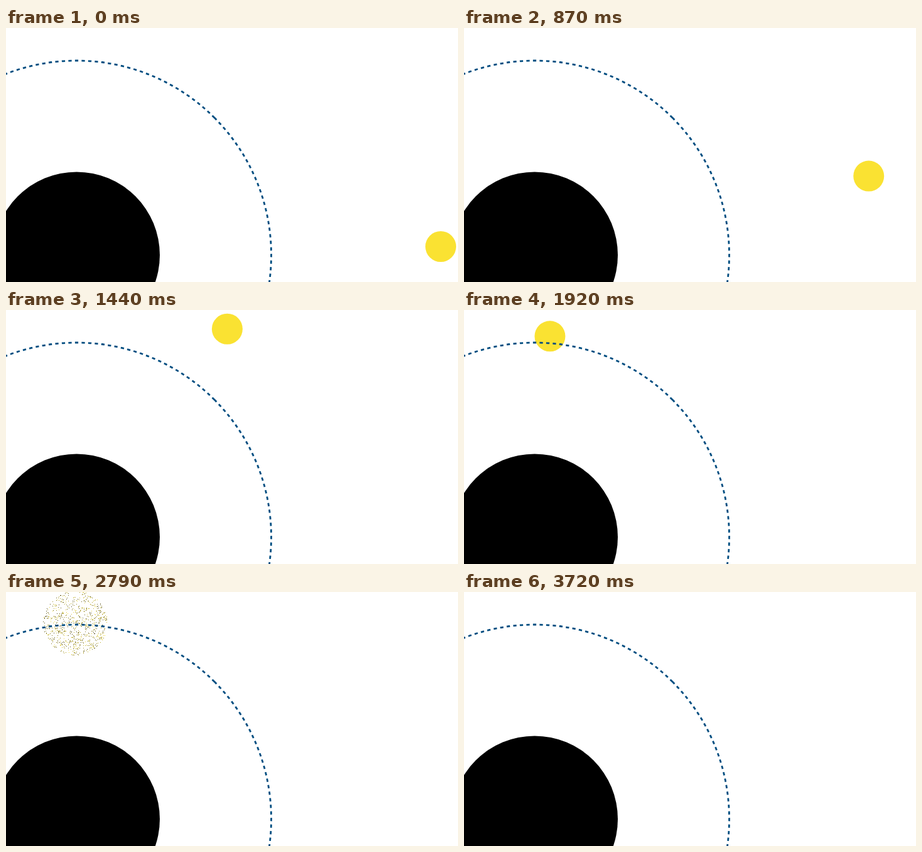
Animation, 720 px wide and 405 px high, one loop 4110 ms. Source, as an HTML page with a canvas:

```html
<!DOCTYPE html>
<html lang="en">
<head>
<meta charset="utf-8">
<title>Orbit</title>
<style>
html, body { margin: 0; width: 100%; height: 100%; overflow: hidden; background: #fff; }
canvas, svg { position: absolute; left: 0; top: 0; width: 720px; height: 405px; display: block; }
</style>
</head>
<body>
<canvas id="dust" width="720" height="405"></canvas>
<svg viewBox="0 0 720 405">
  <path id="route" fill="none" d="M692.5 348.5C634 129 398 -46.5 112 49.5"/>
  <circle cx="112.5" cy="362" r="132.5"/>
  <circle id="star" r="24.5" fill="#fae232"/>
  <circle cx="112.5" cy="362" r="310" fill="none" stroke="#004d80" stroke-width="2.8"
    stroke-dasharray="5.25 5.25" transform="rotate(-45 112.5 362)"/>
</svg>
<script>
const LOOP = 4110, STEP = 30;
const FLY = 360, FLY_TIME = 1800;
const BURST = FLY + FLY_TIME, BURST_TIME = 1560;
const star = document.getElementById('star');
const route = document.getElementById('route');
const routeLength = route.getTotalLength();
const ctx = document.getElementById('dust').getContext('2d');

let seed = 7321;
function rnd() {
  seed = (seed * 1664525 + 1013904223) % 4294967296;
  return seed / 4294967296;
}

const grains = Array.from({ length: 1500 }, () => ({
  angle: rnd() * Math.PI * 2,
  dist: Math.sqrt(rnd()),
  life: 0.1 + 0.9 * Math.pow(rnd(), 1.5),
  dark: rnd() * 0.75
}));

// cubic-bezier(.42, 0, .58, 1)
function easeInOut(x) {
  if (x <= 0) return 0;
  if (x >= 1) return 1;
  let lo = 0, hi = 1, s = 0.5;
  for (let i = 0; i < 24; i++) {
    s = (lo + hi) / 2;
    const q = 1 - s;
    const v = 1.26 * s * q * q + 1.74 * s * s * q + s * s * s;
    if (v < x) lo = s; else hi = s;
  }
  return s * s * (3 - 2 * s);
}

function drawDust(p) {
  ctx.clearRect(0, 0, 720, 405);
  if (p <= 0 || p >= 1) return;
  const radius = 24.5 + 48.5 * Math.pow(p, 0.66);
  const size = p < 0.14 ? 2 : 1;
  const cx = 112 - 3.5 * p;
  for (const g of grains) {
    if (p > g.life) continue;
    const x = Math.round(cx + Math.cos(g.angle) * g.dist * radius - size / 2);
    const y = Math.round(49.5 + Math.sin(g.angle) * g.dist * radius - size / 2);
    const k = 1 - g.dark * Math.min(1, p * 3);
    ctx.fillStyle = `rgb(${250 * k | 0},${226 * k | 0},${50 * k | 0})`;
    ctx.fillRect(x, y, size, size);
  }
}

function render(ms) {
  const t = Math.floor((ms % LOOP) / STEP) * STEP;
  const pos = route.getPointAtLength(routeLength * easeInOut((t - FLY) / FLY_TIME));
  star.setAttribute('cx', pos.x);
  star.setAttribute('cy', pos.y);
  star.setAttribute('visibility', t <= BURST ? 'visible' : 'hidden');
  drawDust((t - BURST) / BURST_TIME);
}

const start = performance.now();
function tick() {
  render(performance.now() - start);
  requestAnimationFrame(tick);
}
tick();
</script>
</body>
</html>
```
